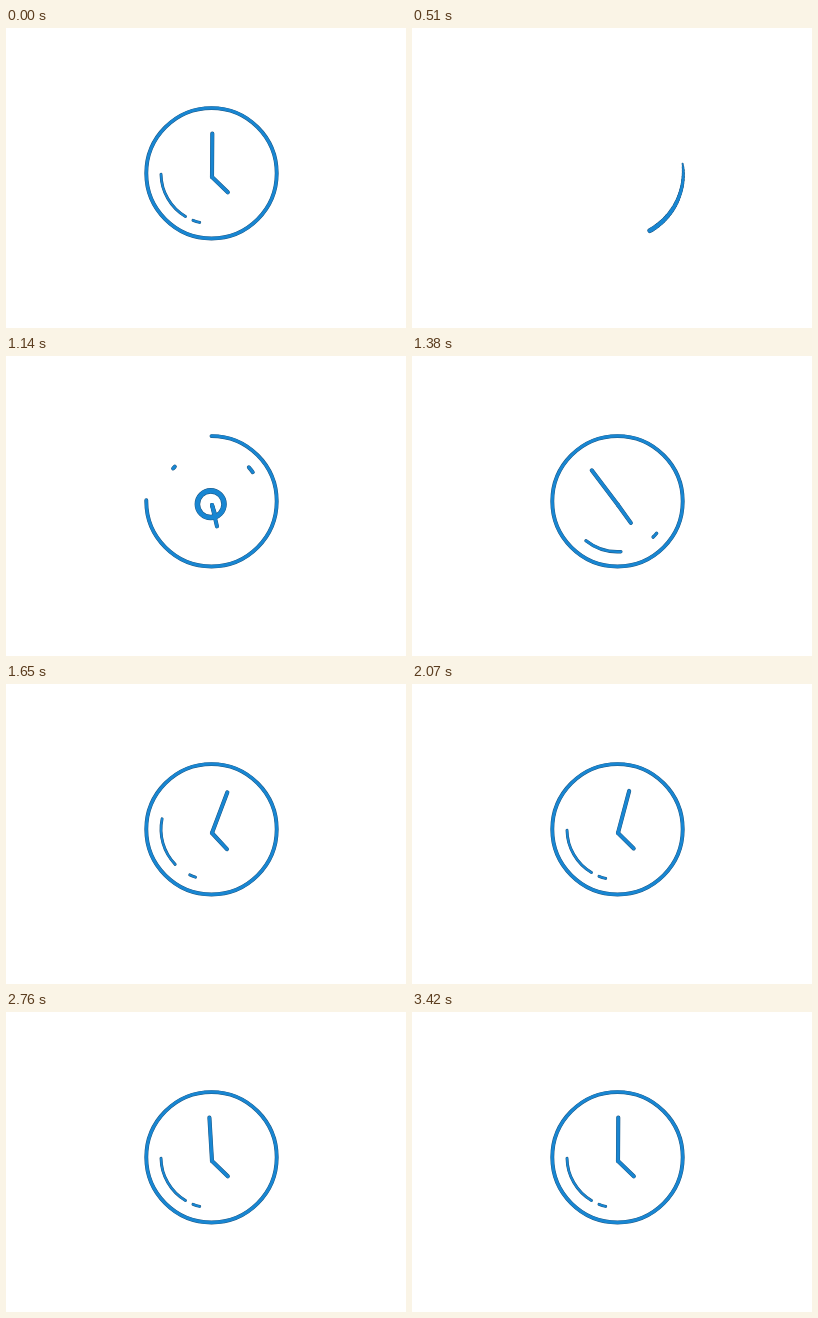
An HTML page with a canvas for the animation above (3450 ms loop, 400 by 300 pixels).

```html
<!DOCTYPE html>
<html lang="en">
<head>
<meta charset="utf-8">
<title>Clock</title>
<style>
  html, body { margin: 0; width: 100%; height: 100%; overflow: hidden; background: #fff; }
  canvas { display: block; }
</style>
</head>
<body>
<canvas width="400" height="300"></canvas>
<script>
const ctx = document.querySelector('canvas').getContext('2d');
const LOOP = 3.45;
const EDGE = { color: '#1f557f', grow: 0.9 }, CORE = { color: '#1886d2', grow: 0 };
const CX = 205.5, CY = 145.3, RADIUS = 65.2, PIVOT_X = 206, PIVOT_Y = 149;
const rad = deg => deg * Math.PI / 180;
const clamp = x => Math.max(0, Math.min(1, x));
const progress = (t, from, to) => clamp((t - from) / (to - from));
const easeOut = p => 1 - (1 - p) ** 2;
const smooth = p => p * p * (3 - 2 * p);
const mix = (a, b, p) => a + (b - a) * p;
let pen = CORE;

function stroke(width) {
  ctx.lineWidth = width + pen.grow;
  ctx.strokeStyle = pen.color;
  ctx.stroke();
}

// Angles in degrees; 0 points right and grows clockwise.
function arc(x, y, radius, from, to, width) {
  ctx.beginPath();
  ctx.arc(x, y, radius, rad(from), rad(to));
  stroke(width);
}

// Hand angle 0 points up.
function hand(angle, length) {
  ctx.beginPath();
  ctx.moveTo(PIVOT_X, PIVOT_Y);
  ctx.lineTo(PIVOT_X + length * Math.sin(rad(angle)), PIVOT_Y - length * Math.cos(rad(angle)));
  stroke(3.2);
}

function drawComet(t) {
  const travel = time => Math.min(360, 150 * (Math.max(0, time - 0.03) / 0.48) ** 2);
  const head = travel(t) - 90, tail = travel(t - 0.127) - 90;
  const steps = 24;
  for (let i = 0; i < steps; i++) {
    arc(CX, CY, RADIUS + 0.6, mix(tail, head, i / steps), mix(tail, head, (i + 1) / steps),
      mix(1, 4, Math.sqrt(i / steps)));
  }
}

function drawBall(t) {
  const p = progress(t, 0.774, 1.04);
  const y = t < 0.86
    ? mix(80, 66, easeOut(progress(t, 0.774, 0.86)))
    : mix(66, 148, progress(t, 0.86, 1.04) ** 2);
  ctx.beginPath();
  ctx.arc(CX, y, mix(2.4, 3.5, p) + pen.grow / 2, 0, 2 * Math.PI);
  ctx.fillStyle = pen.color;
  ctx.fill();
}

function drawRing(t) {
  const p = progress(t, 1.04, 1.26);
  arc(204.7, 148.2, mix(2, 18, easeOut(p)), 0, 360, 8.6 * (1 - p));
}

function drawGloss(t, start, overshoot, rest, startSpan, midSpan, span) {
  const swing = easeOut(progress(t, 1.14, 1.65));
  const settle = smooth(progress(t, 1.65, 2.04));
  const center = mix(mix(start, overshoot, swing), rest, settle);
  const length = mix(mix(startSpan, midSpan, swing), span, settle) * progress(t, 1.06, 1.14);
  const width = mix(3, 2, progress(t, 1.14, 1.65));
  arc(CX, CY, 50.5, center - length / 2, center + length / 2, width);
}

function minuteAngle(t) {
  const s = t - 1.5;
  return s < 0
    ? 200 * s - 941 * s * s
    : 57.3 * Math.exp(-2.2 * s) * Math.sin(Math.PI * s / 0.9);
}

function drawHands(t) {
  const growth = t < 1.14
    ? 0.5 * progress(t, 1.04, 1.14)
    : mix(0.5, 1, easeOut(progress(t, 1.14, 1.36)));
  hand(minuteAngle(t), 43.5 * growth);
  hand(134 + 28 * Math.exp((1.14 - t) / 0.24), 22 * growth);
}

function drawScene(t) {
  if (t < 0.897) drawComet(t);
  if (t >= 0.774 && t < 1.04) drawBall(t);
  const sweep = 360 * progress(t, 0.84, 1.24);
  if (sweep) arc(CX, CY, RADIUS, -90, sweep - 90, 3);
  if (t >= 1.04) {
    if (t < 1.26) drawRing(t);
    drawHands(t);
  }
  if (t > 1.06) {
    drawGloss(t, -39.5, 164, 150, 7, 56, 58);
    drawGloss(t, -139, 112, 107.5, 3, 7, 8);
  }
}

function tick(now) {
  const t = now / 1000 % LOOP;
  ctx.clearRect(0, 0, 400, 300);
  ctx.lineCap = 'round';
  for (pen of [EDGE, CORE]) drawScene(t < 0.03 ? LOOP : t);
  requestAnimationFrame(tick);
}
requestAnimationFrame(tick);
</script>
</body>
</html>
```
